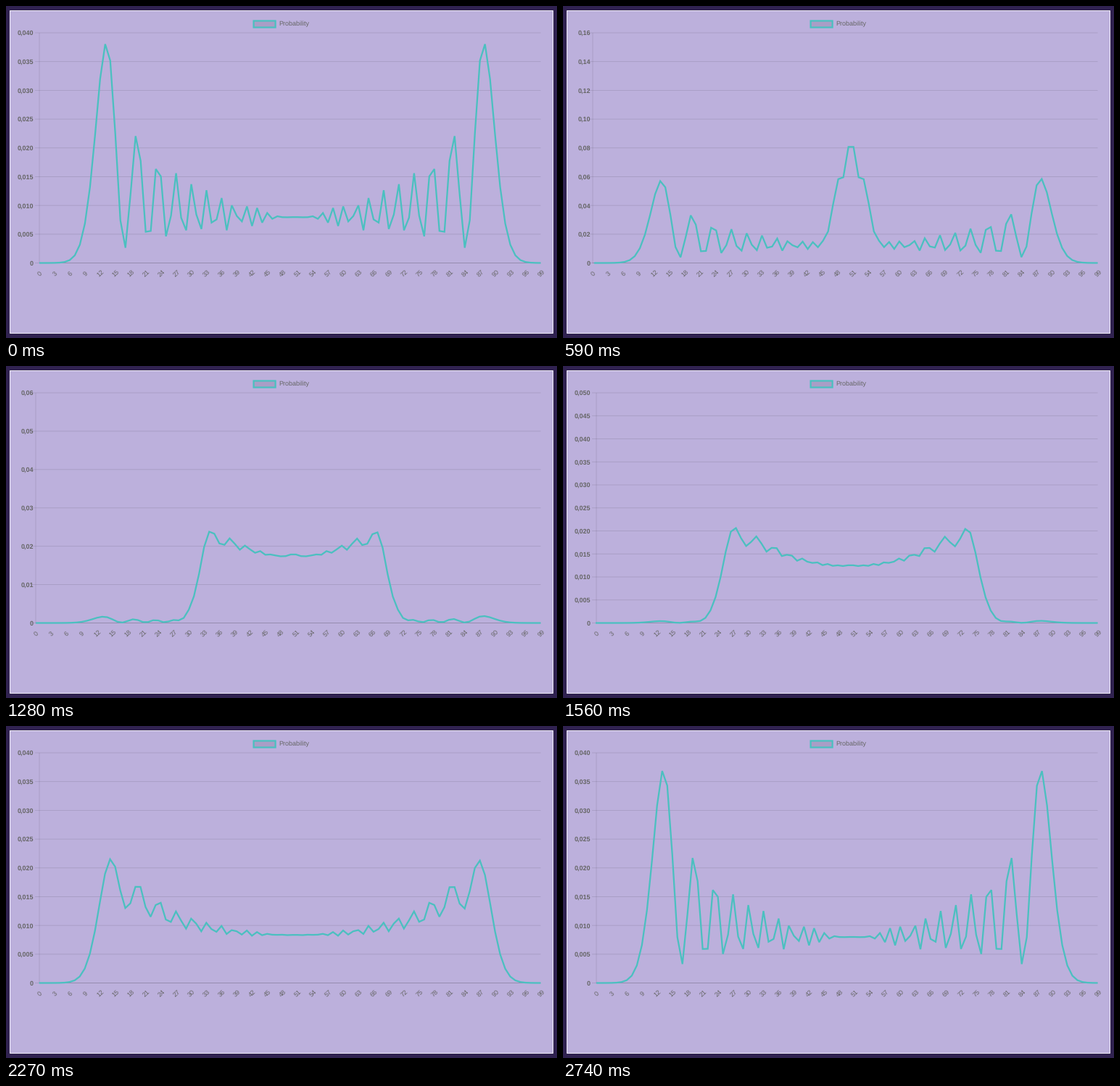
A matplotlib script for the animation above (2770 ms loop, 760 by 458 pixels).

```python
import numpy as np
import matplotlib.pyplot as plt
from matplotlib.animation import FuncAnimation
from matplotlib.patches import Rectangle

W, H, DPI = 760, 458, 100
LOOP, TICK = 2770, 10
PX = 72 / DPI
TOP, BASE, RIGHT = 37.0, 354.5, 737.5
SITES = np.arange(100)
TEAL, INK = "#4bc0c0", "#666666"

RESET, LAST_UPDATE, EASE_MS = 338, 2210, 1000
RATE = 3.9e-3 * (1 - 0.00035 * (SITES - 13))  # later points restart a little later

# spread of the walk over time
SPREAD_T = [390, 590, 990, 1560, 1990, LAST_UPDATE]
SPREAD_R = [0, 4.6, 14.2, 26.9, 35.3, 40]

# times at which the picture is refreshed
STEP_K = [0, 7, 8, 16, 17, 19, 32, 33, 48, 49, 58, 59, 65, 66, 72]
STEP_T = [370, 590, 630, 890, 920, 990, 1420, 1460, 1950, 1990,
          2270, 2310, 2510, 2540, 2740]
REFRESH = np.round(np.interp(np.arange(73), STEP_K, STEP_T) / 10).astype(int) * 10


def walk(spread):
    """Probabilities of a continuous quantum walk from sites 50 and 51."""
    angle = np.linspace(0, 2 * np.pi, 256, endpoint=False)
    bessel2 = np.abs(np.fft.fft(np.exp(1j * spread * np.sin(angle))) / 256) ** 2
    return (bessel2[abs(SITES - 50)] + bessel2[abs(SITES - 51)]) / 2


def nice_scale(peak):
    """Tick spacing and number of intervals for a y axis from zero."""
    raw = peak / 10
    unit = 10 ** np.floor(np.log10(raw))
    spacing = unit * next(m for m in (1, 2, 5, 10) if raw / unit <= m + 1e-9)
    return spacing, int(np.ceil(peak / spacing - 1e-9))


def layout(spread):
    """Axis and resting point positions for one state of the walk."""
    prob = walk(spread)
    spacing, count = nice_scale(prob.max())
    left = 46.0 if spacing < 0.009 else 41.0
    x = left + (RIGHT - left) * SITES / 99
    y = BASE - (BASE - TOP) * prob / (spacing * count)
    return (spacing, count, left), np.array([x, y])


def simulate():
    """Map each refresh time to its axis and point positions."""
    axis, goal = layout(40)
    states = {0: (axis, goal)}
    pts, dt = goal.copy(), 2
    wanted = set(REFRESH.tolist())
    for t in range(RESET + dt, LAST_UPDATE + 1, dt):
        axis, goal = layout(np.interp(t, SPREAD_T, SPREAD_R))
        pts = goal + (pts - goal) * np.exp(-RATE * dt)
        if t in wanted:
            states[t] = (axis, pts)
    for t in REFRESH[REFRESH > LAST_UPDATE]:
        rest = (1 - (t - LAST_UPDATE) / EASE_MS) ** 4
        states[int(t)] = (axis, goal + (pts - goal) * rest)
    return states


STATES = simulate()

plt.rcParams["font.family"] = "Liberation Sans"
plt.rcParams["text.hinting"] = "none"
fig = plt.figure(figsize=(W / DPI, H / DPI), dpi=DPI, facecolor="#302250")
ax = fig.add_axes([0, 0, 1, 1])
ax.set_xlim(0, W)
ax.set_ylim(H, 0)
ax.axis("off")


def rect(x, y, w, h, **style):
    return ax.add_patch(Rectangle((x, y), w, h, snap=False, **style))


def label(x, y, text="", **style):
    return ax.text(x, y, text, size=9 * PX, color=INK, **style)


def rule(alpha):
    return ax.plot([], [], color="black", alpha=alpha, lw=0.8 * PX,
                   solid_capstyle="butt", snap=False)[0]


rect(5.5, 6.5, 749, 445, fc="#bcb0dc", ec="#f0edf8", lw=PX)
rect(341.6, 20.5, 30, 9, fc="#a99ec6", ec=TEAL, lw=2.25 * PX, joinstyle="miter")
label(376.3, 27.3, "Probability", va="baseline")

grid = [rule(0.12) for _ in range(12)]
y_labels = [label(0, 0, ha="right", va="baseline", weight="bold") for _ in grid]
x_labels = [label(0, 369.3, str(n), ha="center", va="center", rotation=43)
            for n in range(0, 100, 3)]
y_axis, x_axis = rule(0.12), rule(0.14)
curve, = ax.plot([], [], color=TEAL, lw=2.25 * PX, solid_joinstyle="miter",
                 solid_capstyle="butt", snap=False)


def draw(frame):
    t = frame * TICK
    past = REFRESH[REFRESH <= t]
    (spacing, count, left), (x, y) = STATES[int(past[-1]) if len(past) else 0]

    digits = 3 if spacing < 0.009 else 2
    for i, (line, text) in enumerate(zip(grid, y_labels)):
        shown = i <= count
        line.set_visible(shown)
        text.set_visible(shown)
        if shown:
            level = BASE - (BASE - TOP) * i / count
            line.set_data([left - 6, RIGHT], [level, level])
            value = f"{i * spacing:.{digits}f}".replace(".", ",") if i else "0"
            text.set_text(value)
            text.set_position((38, level + 3))

    for i, text in enumerate(x_labels):
        text.set_x(left + (RIGHT - left) * 3 * i / 99 + 0.6)

    y_axis.set_data([left, left], [TOP, BASE + 0.5])
    x_axis.set_data([left, RIGHT], [BASE, BASE])
    curve.set_data(x, y)
    curve.set_clip_path(Rectangle((left - 1, TOP - 1), RIGHT - left + 2,
                                  BASE - TOP + 2.5, transform=ax.transData))
    return [curve]


anim = FuncAnimation(fig, draw, frames=LOOP // TICK, interval=TICK,
                     repeat=True, repeat_delay=0, blit=False)
plt.show()
```
